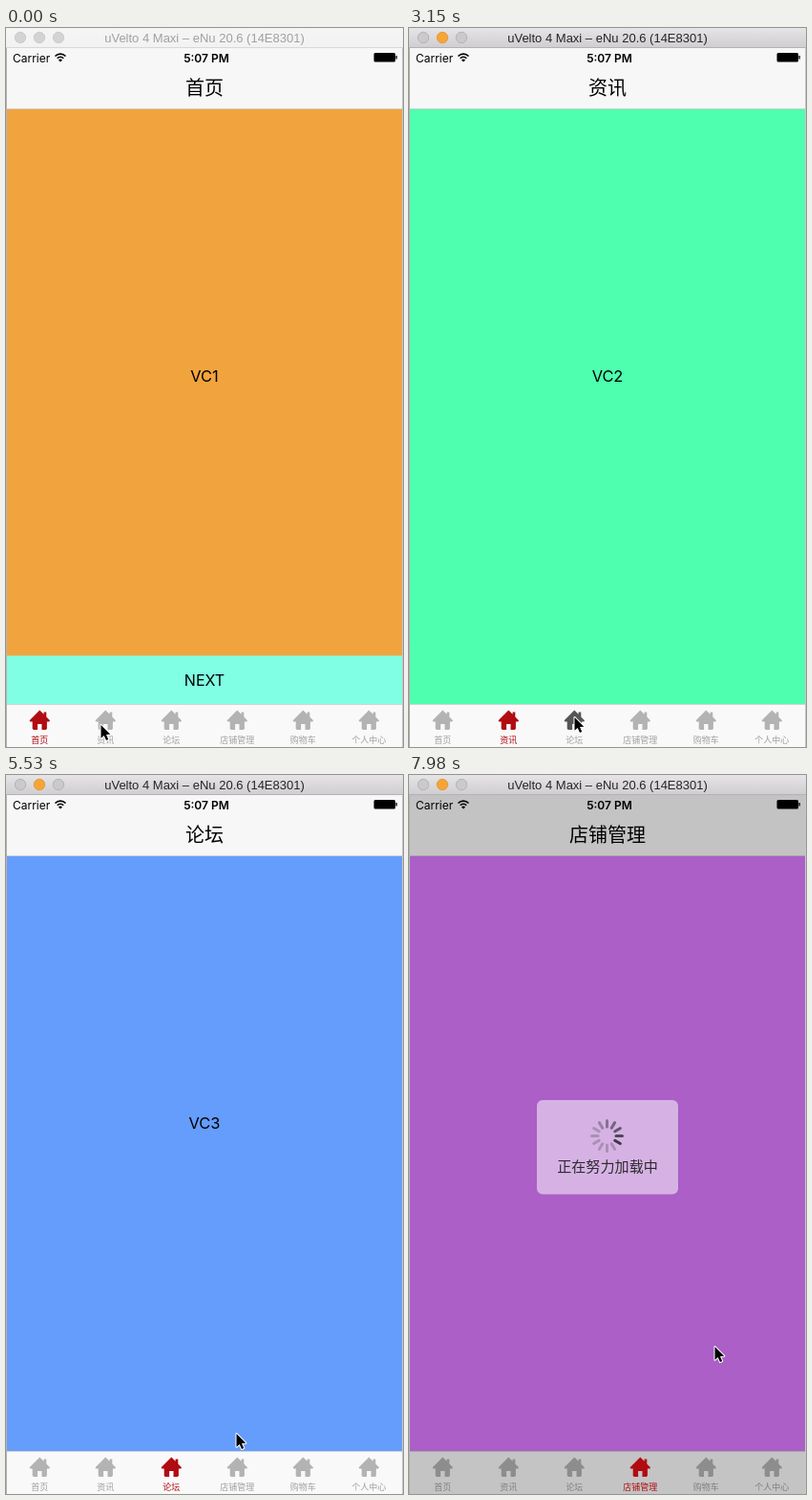
An HTML page with a canvas for the animation above (8000 ms loop, 416 by 752 pixels).

```html
<!DOCTYPE html>
<html lang="zh">
<head>
<meta charset="utf-8">
<title>Tab bar demo</title>
<style>
html, body { margin: 0; width: 100%; height: 100%; overflow: hidden; background: #f7f7f7; }
canvas { display: block; width: 416px; height: 752px; }
</style>
</head>
<body>
<canvas id="stage"></canvas>
<script>
const W = 416, H = 752, LOOP = 8000, STEP = 70;
const LATIN = 'Inter, "Open Sans", sans-serif';
const CJK = '"Noto Sans CJK SC", "Noto Sans CJK", sans-serif';
const RED = '#b00c12';
const LABELS = ['首页', '资讯', '论坛', '店铺管理', '购物车', '个人中心'];
const COLORS = ['#f1a43e', '#4dffaf', '#659dfc', '#d979fc'];

// at: tab switch, press: finger-down highlight, load: spinner start, head: dark spoke at time zero
const VISITS = [
  { at: 0, press: -1, load: Infinity, head: 0 },
  { at: 210, press: 140, load: 220, head: 4 },
  { at: 3220, press: 3080, load: 3230, head: 9 },
  { at: 6370, press: 6230, load: 6380, head: 10 }
];
const LOAD_TIME = 2250, FADE = 250, DIM = 0.21;

// time, x, y of the pointer tip
const POINTER = [
  [0, 99, 728], [240, 99, 728], [640, 175, 729], [1260, 174, 728], [2240, 176, 727],
  [3010, 173, 720], [3220, 173, 720], [3850, 205, 598], [4130, 221, 580], [4480, 285, 592],
  [4760, 280, 615], [5530, 241, 688], [5950, 246, 728], [6440, 246, 728],
  [7140, 316, 601], [7980, 320, 597]
];

const canvas = document.getElementById('stage');
const ctx = canvas.getContext('2d');
const dpr = window.devicePixelRatio || 1;
canvas.width = W * dpr;
canvas.height = H * dpr;

const clamp = v => Math.max(0, Math.min(1, v));
const smooth = v => v * v * (3 - 2 * v);

function rect(x, y, w, h, fill) {
  ctx.fillStyle = fill;
  ctx.fillRect(x, y, w, h);
}

function text(str, x, y, font, fill, align = 'center') {
  ctx.font = font;
  ctx.fillStyle = fill;
  ctx.textAlign = align;
  ctx.fillText(str, x, y);
}

function polygon(points) {
  ctx.beginPath();
  points.forEach(([x, y]) => ctx.lineTo(x, y));
  ctx.closePath();
}

function pointerAt(t) {
  const i = POINTER.findIndex(p => p[0] > t);
  if (i < 0) return POINTER[POINTER.length - 1].slice(1);
  const [t0, x0, y0] = POINTER[i - 1], [t1, x1, y1] = POINTER[i];
  const k = smooth((t - t0) / (t1 - t0));
  return [x0 + (x1 - x0) * k, y0 + (y1 - y0) * k];
}

function drawWindowBar(active) {
  const grad = ctx.createLinearGradient(0, 0, 0, 20);
  grad.addColorStop(0, active ? '#e6e4e6' : '#f5f5f5');
  grad.addColorStop(1, active ? '#d0ced0' : '#f2f2f2');
  rect(0, 0, W, 20, grad);
  rect(0, 20, W, 1, active ? '#b4b2b4' : '#d8d8d8');
  [15, 35, 55].forEach((x, i) => {
    const lit = active && i === 1;
    ctx.beginPath();
    ctx.arc(x, 10, 5.7, 0, Math.PI * 2);
    ctx.fillStyle = lit ? '#f6a536' : active ? '#cbcacb' : '#d3d3d3';
    ctx.fill();
    ctx.lineWidth = 0.8;
    ctx.strokeStyle = lit ? '#dd9430' : active ? '#aeadae' : '#c6c6c6';
    ctx.stroke();
  });
  text('uVelto 4 Maxi – eNu 20.6 (14E8301)', 208, 15,
    '13px "Liberation Sans", sans-serif', active ? '#262526' : '#a0a0a0');
}

function drawStatus() {
  text('Carrier', 7, 36, `12px ${LATIN}`, '#000', 'left');
  text('5:07 PM', 210, 36, `600 12px ${LATIN}`, '#000');
  ctx.strokeStyle = '#000';
  ctx.lineWidth = 1.7;
  [4.6, 7.8].forEach(r => {
    ctx.beginPath();
    ctx.arc(57, 35, r, -Math.PI * 0.75, -Math.PI * 0.25);
    ctx.stroke();
  });
  ctx.beginPath();
  ctx.moveTo(57, 35.5);
  ctx.arc(57, 35.5, 2.8, -Math.PI * 0.75, -Math.PI * 0.25);
  ctx.fillStyle = '#000';
  ctx.fill();
  ctx.beginPath();
  ctx.roundRect(385.5, 26, 22.5, 9.5, 1.5);
  ctx.fill();
  rect(408.5, 29, 1.3, 3.5, '#000');
}

function drawHouse(x, y, fill) {
  ctx.fillStyle = fill;
  polygon([[x, y - 10.5], [x + 4.3, y - 6.2], [x + 4.3, y - 8.5], [x + 7, y - 8.5],
    [x + 7, y - 3.6], [x + 10.7, y + 0.2], [x + 10, y + 1.5], [x + 7.6, y + 1.5],
    [x + 7.6, y + 9], [x + 6.4, y + 10], [x + 2.2, y + 10], [x + 2.2, y + 4],
    [x - 2.2, y + 4], [x - 2.2, y + 10], [x - 6.4, y + 10], [x - 7.6, y + 9],
    [x - 7.6, y + 1.5], [x - 10, y + 1.5], [x - 10.7, y + 0.2]]);
  ctx.fill();
}

function drawTab(i, iconFill, labelFill) {
  const x = 35.3 + i * 69;
  drawHouse(x, 724, iconFill);
  text(LABELS[i], x, 748, `9px ${CJK}`, labelFill);
}

function drawTabBar(selected, pressed) {
  rect(1, 707, 414, 45, '#f9f9f9');
  rect(1, 707, 414, 1, '#d2d2d2');
  LABELS.forEach((_, i) => {
    if (i !== selected) drawTab(i, i === pressed ? '#56565a' : '#b3b3b3', '#a0a0a0');
  });
}

function drawSpinner(x, y, head) {
  ctx.lineWidth = 3;
  ctx.lineCap = 'round';
  for (let i = 0; i < 12; i++) {
    const behind = (head - i + 24) % 12;
    const a = i * Math.PI / 6 - Math.PI / 2;
    ctx.strokeStyle = `rgba(45,42,50,${0.26 + 0.64 * clamp(1 - behind / 6)})`;
    ctx.beginPath();
    ctx.moveTo(x + Math.cos(a) * 9.5, y + Math.sin(a) * 9.5);
    ctx.lineTo(x + Math.cos(a) * 16, y + Math.sin(a) * 16);
    ctx.stroke();
  }
  ctx.lineCap = 'butt';
}

// The panel blurs what lies behind it, so it starts from the plain page colour.
function drawLoader(alpha, head, pageColor) {
  const dim = `rgba(0,0,0,${DIM})`;
  ctx.globalAlpha = alpha;
  rect(0, 21, W, H - 21, dim);
  ctx.beginPath();
  ctx.roundRect(134, 340, 148, 98.5, 6);
  [pageColor, dim, 'rgba(255,255,255,0.52)'].forEach(fill => {
    ctx.fillStyle = fill;
    ctx.fill();
  });
  drawSpinner(207.5, 377.5, head);
  text('正在努力加载中', 208, 415, `15.1px ${CJK}`, '#2b2b2b');
  ctx.globalAlpha = 1;
}

function drawPointer(x, y) {
  x += 0.5;
  y += 1;
  polygon([[x, y], [x, y + 13.8], [x + 3.2, y + 10.9], [x + 5.5, y + 16],
    [x + 7.7, y + 15], [x + 5.5, y + 10], [x + 9.8, y + 9.8]]);
  ctx.lineJoin = 'round';
  ctx.lineWidth = 2;
  ctx.strokeStyle = '#fff';
  ctx.stroke();
  ctx.fillStyle = '#000';
  ctx.fill();
}

function draw(t) {
  const page = VISITS.findLastIndex(v => t >= v.at);
  const visit = VISITS[page];
  const next = VISITS[page + 1];
  const pressed = next && t >= next.press ? page + 1 : -1;

  ctx.setTransform(dpr, 0, 0, dpr, 0, 0);
  rect(0, 0, W, H, '#f7f7f7');
  drawWindowBar(t >= VISITS[1].press);
  drawStatus();
  text(LABELS[page], 208, 69.5, `20px ${CJK}`, '#000');
  rect(0, 85, W, 622, COLORS[page]);
  rect(0, 84, W, 1, '#d2d2d2');
  text('VC' + (page + 1), 208, 370, `16.4px ${LATIN}`, '#000');
  if (page === 0) {
    rect(0, 656.5, W, 50.5, '#80ffe4');
    text('NEXT', 208, 688, `16px ${LATIN}`, '#000');
  }
  drawTabBar(page, pressed);

  const age = t - visit.load;
  const alpha = Math.min(clamp(age / FADE), clamp((LOAD_TIME - age) / FADE));
  if (alpha > 0) drawLoader(alpha, (visit.head + Math.round(t / STEP)) % 12, COLORS[page]);

  // The selected tab keeps its full red while the page is dimmed.
  drawTab(page, RED, RED);
  rect(0, 21, 1, H - 21, '#b4b4b4');
  rect(415, 21, 1, H - 21, '#c8c8c8');
  drawPointer(...pointerAt(t));
}

function frame() {
  const t = performance.now() % LOOP;
  draw(Math.floor(t / STEP) * STEP);
  requestAnimationFrame(frame);
}
frame();
</script>
</body>
</html>
```
